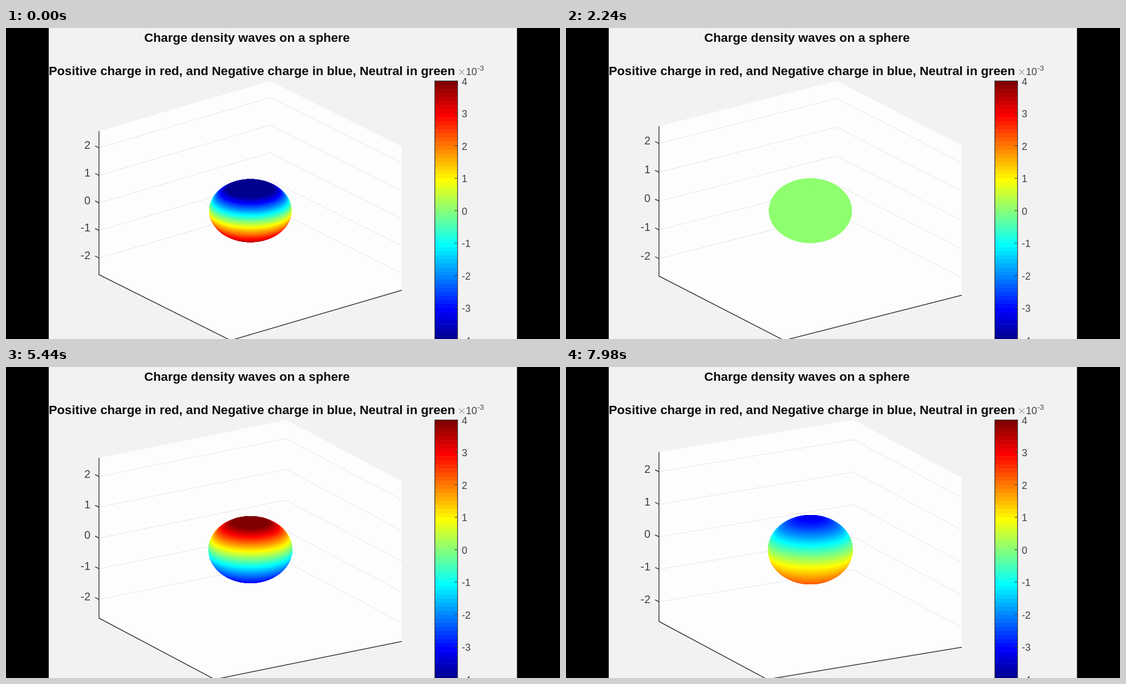
An HTML page with a canvas for the animation above (8000 ms loop, 998 by 561 pixels).

```html
<!DOCTYPE html>
<html lang="en">
<head>
<meta charset="utf-8">
<title>Charge density waves on a sphere</title>
<style>
  html, body { margin: 0; width: 100%; height: 100%; overflow: hidden; background: #000; }
  canvas { display: block; }
</style>
</head>
<body>
<canvas id="stage" width="998" height="561"></canvas>
<script>
const ctx = document.getElementById('stage').getContext('2d');
const LOOP = 8000;
const CENTER = { x: 440.25, y: 329.5 };
const LEFT = 167.5, RIGHT = 713;
const RANGE = 5.21; // axis length in data units
const SPHERE_RADIUS = 0.993;
const DARK = '#383838';

// 64-level jet colour map over charges -4..4
const ramp = v => Math.round(255 * Math.max(0, Math.min(1, v / 16)));
const JET = Array.from({ length: 64 }, (_, k) => {
  const i = k + 1;
  const r = ramp(Math.min(i - 24, 72 - i));
  const g = ramp(Math.min(i - 8, 56 - i));
  const b = ramp(Math.min(i + 8, 40 - i));
  return `rgb(${r},${g},${b})`;
});
// The small bias keeps a neutral sphere in one colour level
const chargeColor = q => JET[Math.max(0, Math.min(63, Math.floor((q + 4) * 8 + 0.1)))];

function text(str, x, y, size, { weight = 'normal', align = 'left', color = '#404040' } = {}) {
  ctx.font = `${weight} ${size}px "Liberation Sans", Arial, sans-serif`;
  ctx.textAlign = align;
  ctx.fillStyle = color;
  ctx.fillText(str, x, y);
}

function trace(points) {
  ctx.beginPath();
  points.forEach(([x, y]) => ctx.lineTo(x, y));
}

function line(points, color, width) {
  trace(points);
  ctx.strokeStyle = color;
  ctx.lineWidth = width;
  ctx.stroke();
}

// Pictures advance in short steps, with a brief hold at the end of each 840 ms
function steppedTime(t) {
  const phase = (t + 20) % 840;
  return t - phase + Math.min(17, Math.floor(phase / 43.5)) * 43.5;
}

// The box is symmetric about its centre, so three corners define the view
function viewAt(t) {
  const u = t / 7980;
  const height = 259 + 46.5 * (0.85 * u + 0.15 * u * u);
  const backX = 476 + 42 * u;
  const backTop = 95.5;
  const rightBottom = 473 + 32.5 * u;
  const leftTop = 2 * CENTER.y - rightBottom;
  const frontX = 2 * CENTER.x - backX;
  const frontBottom = 2 * CENTER.y - backTop;
  const dx = RIGHT - frontX, dy = frontX - LEFT;
  const unit = Math.hypot(dx, dy) / RANGE;
  const tilt = (frontBottom - rightBottom) / dy;
  return { height, backX, backTop, rightBottom, leftTop, frontX, frontBottom,
           unit, tilt, unitZ: height / RANGE };
}

function drawBox(v) {
  const leftBottom = v.leftTop + v.height;
  const front = [[LEFT, leftBottom], [v.frontX, v.frontBottom], [RIGHT, v.rightBottom]];
  const rightTop = v.rightBottom - v.height;
  trace([[LEFT, v.leftTop], [v.backX, v.backTop], [RIGHT, rightTop], ...front.slice().reverse()]);
  ctx.fillStyle = '#fdfdfe';
  ctx.fill();

  for (let z = -2; z <= 2; z++) {
    const drop = (RANGE / 2 - z) * v.unitZ;
    const y = v.leftTop + drop;
    line([[LEFT, y], [v.backX, v.backTop + drop], [RIGHT, rightTop + drop]], '#e5e5e8', 1);
    line([[160.5, y - 3.5], [LEFT, y]], DARK, 1.5);
    text(z, 152, y + 2, 20, { align: 'right' });
  }
  line([[LEFT, v.leftTop], ...front], DARK, 1.5);
}

// Stacked horizontal slices, painted from the lower pole to the upper one
function drawSphere(v, t) {
  const amplitude = 4.6 * Math.sin(Math.PI * (t - 2225) / 4760);
  const slices = 360;
  for (let i = 0; i < slices; i++) {
    const angle = Math.PI * (1 - (i + 0.5) / slices);
    const z = Math.cos(angle);
    const radius = SPHERE_RADIUS * v.unit * Math.sin(angle);
    const y = CENTER.y - SPHERE_RADIUS * v.unitZ * z;
    ctx.beginPath();
    ctx.ellipse(CENTER.x, y, radius, radius * v.tilt, 0, 0, 2 * Math.PI);
    ctx.fillStyle = chargeColor(amplitude * (z + 0.3 * z * z - 0.15));
    ctx.fill();
  }
}

function drawColorbar() {
  const x = 773, width = 40, top = 95.5, step = 58.5;
  const band = step / 8;
  for (let i = 0; i < 64; i++) {
    ctx.fillStyle = JET[63 - i];
    ctx.fillRect(x, top + i * band, width, band + 0.5);
  }
  ctx.strokeStyle = DARK;
  ctx.lineWidth = 1.3;
  ctx.strokeRect(x - 0.5, top, width + 1, step * 8);
  for (let q = 4; q >= -4; q--) {
    const y = top + (4 - q) * step;
    line([[x + width - 5, y], [x + width, y]], DARK, 1);
    text(q, 821, y + 7.2, 18);
  }
}

function drawTitles() {
  const bold = { weight: 'bold', color: '#0c0c0c' };
  text('Charge density waves on a sphere', 249, 24.7, 22.6, bold);
  text('Positive charge in red, and Negative charge in blue, Neutral in green', 77, 84.7, 22.6, bold);
  line([[816.5, 75], [825.5, 84]], '#666', 1);
  line([[825.5, 75], [816.5, 84]], '#666', 1);
  text('10', 828.5, 85, 18);
  text('-3', 849, 76.5, 13.5);
}

function render(now) {
  const t = steppedTime(now % LOOP);
  const view = viewAt(t);
  ctx.fillStyle = '#000';
  ctx.fillRect(0, 0, 998, 561);
  ctx.fillStyle = '#f2f2f3';
  ctx.fillRect(77, 0, 843.5, 561);
  drawBox(view);
  drawSphere(view, t);
  drawColorbar();
  drawTitles();
  requestAnimationFrame(render);
}
requestAnimationFrame(render);
</script>
</body>
</html>
```
